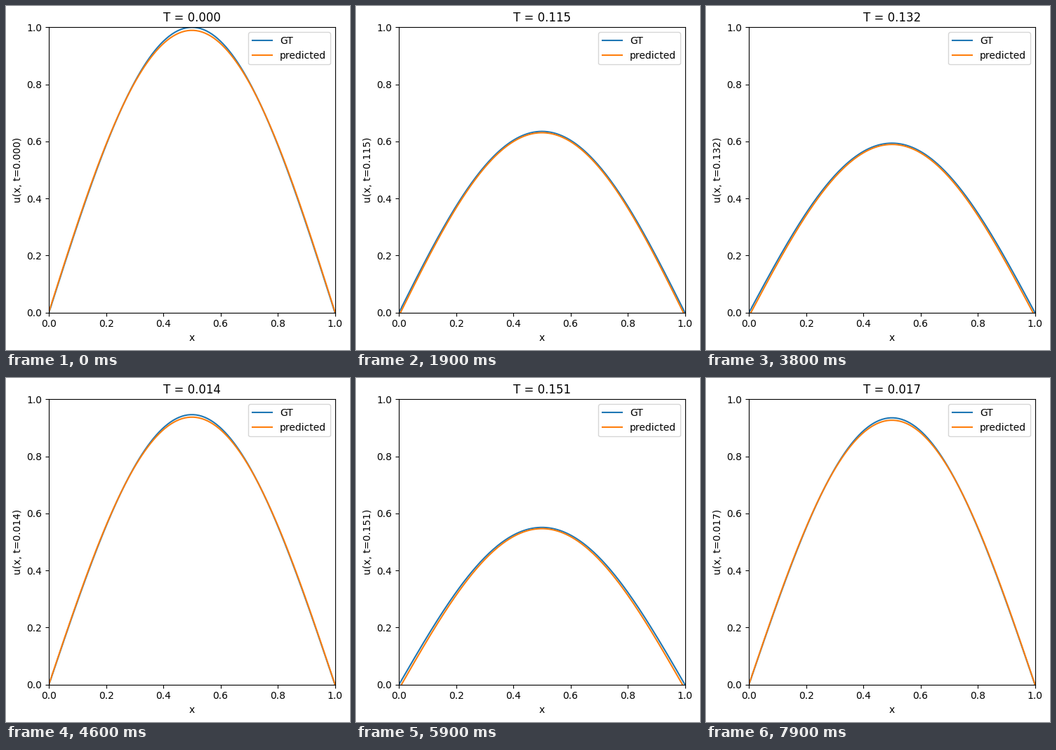
A matplotlib script for the animation above (8 s loop, 490 by 490 pixels).

```python
import numpy as np
import matplotlib.pyplot as plt
from matplotlib.animation import FuncAnimation

SIZE, DPI = 490, 100
FRAMES, INTERVAL = 80, 100
DECAY = 0.4 * np.pi**2

# Snapshots play in alphabetical order of their step number: 0, 1, 10, 100, 101, ...
STEPS = sorted(range(1000), key=str)[:FRAMES]

x = np.linspace(0, 1, 201)
mode1, mode3 = np.sin(np.pi * x), np.sin(3 * np.pi * x)


def exact(t):
    return np.exp(-DECAY * t) * mode1


def model_error(t):
    """Smooth deviation, fixed by its value at the edge and at the peak."""
    edge = 0.003 - 0.12 * t
    peak = -0.0042 - 0.0065 * np.exp(-t / 0.04)
    ripple = -0.005 + 0.04 * t
    return edge + (peak - edge - ripple) * mode1 - ripple * mode3


plt.rcParams["font.family"] = "DejaVu Sans"
fig, ax = plt.subplots(figsize=(SIZE / DPI, SIZE / DPI), dpi=DPI)
fig.subplots_adjust(left=61.2 / SIZE, right=468.52 / SIZE,
                    bottom=53.28 / SIZE, top=459.67 / SIZE)
truth, = ax.plot(x, exact(0), label="GT")
predicted, = ax.plot(x, exact(0) + model_error(0), label="predicted")
ax.set(xlim=(0, 1), ylim=(0, 1), xlabel="x")
ax.legend(loc="upper right")


def update(i):
    t = STEPS[i] / 1000
    u = exact(t)
    truth.set_ydata(u)
    predicted.set_ydata(u + model_error(t))
    ax.set_title(f"T = {t:.3f}")
    ax.set_ylabel(f"u(x, t={t:.3f})")
    return truth, predicted


anim = FuncAnimation(fig, update, frames=FRAMES, init_func=lambda: update(0),
                     interval=INTERVAL, repeat=True, repeat_delay=0, blit=False)
plt.show()
```
